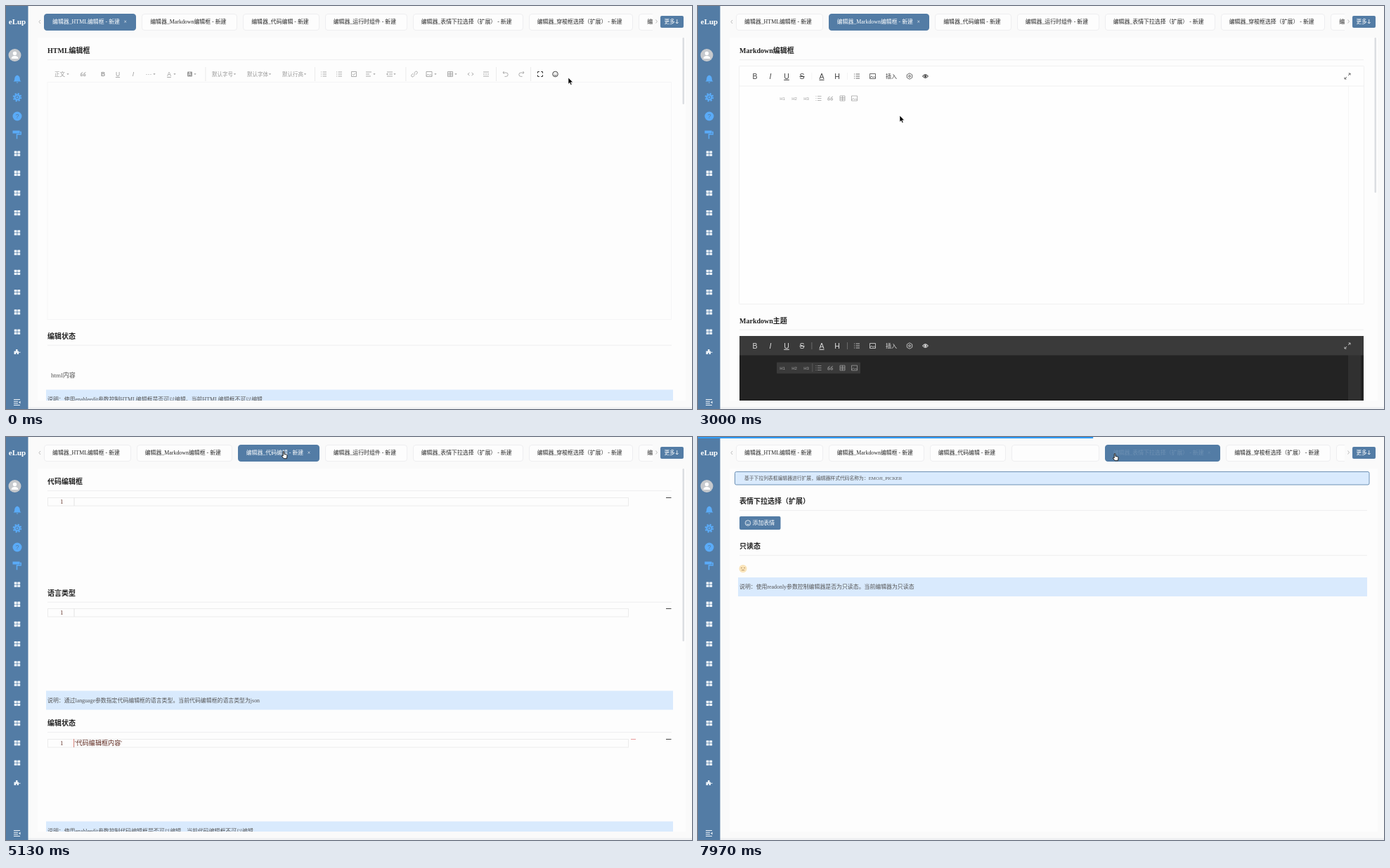
Recreate the animation shown at these times as an HTML page. Size 976x574 px, loop 8000 ms.

```html
<!DOCTYPE html>
<html lang="zh-CN">
<head>
<meta charset="utf-8">
<title>编辑器</title>
<style>
@property --a { syntax: "<number>"; inherits: true; initial-value: 0; } /* active */
@property --h { syntax: "<number>"; inherits: true; initial-value: 0; } /* hover */
@property --w { syntax: "<number>"; inherits: true; initial-value: 0; } /* extra width */
@property --o { syntax: "<number>"; inherits: true; initial-value: 1; } /* label opacity */

html, body { margin: 0; width: 100%; height: 100%; overflow: hidden; background: #fafafa; }
body, text { font-family: "Liberation Serif", "Noto Sans CJK SC", "Noto Sans CJK", serif; }
#stage { position: absolute; left: 0; top: 0; width: 976px; height: 574px; overflow: hidden; }
svg { position: absolute; left: 0; top: 0; }
.sans { font-family: "Liberation Sans", "Noto Sans CJK SC", sans-serif; }

.page, .arrow, .hand { animation: 8s step-end infinite; }
#p1 { animation-name: p1; }
#p2 { animation-name: p2; }
#p3 { animation-name: p3; }
#p4 { animation-name: p4; }
#p5 { animation-name: p5; }
@keyframes p1 { 0% { visibility: visible } 28%, 100% { visibility: hidden } }
@keyframes p2 { 0% { visibility: hidden } 28% { visibility: visible } 56.25%, 100% { visibility: hidden } }
@keyframes p3 { 0% { visibility: hidden } 56.25% { visibility: visible } 80.25%, 100% { visibility: hidden } }
@keyframes p4 { 0% { visibility: hidden } 80.25% { visibility: visible } 98.5%, 100% { visibility: hidden } }
@keyframes p5 { 0% { visibility: hidden } 98.5%, 100% { visibility: visible } }

#scroll { animation: scroll 8s ease-in-out infinite; }
#thumb { animation: thumb 8s ease-in-out infinite; }
@keyframes scroll { 0%, 38.875% { transform: translateY(0) } 42.375%, 100% { transform: translateY(-406px) } }
@keyframes thumb { 0%, 38.875% { transform: translateY(0) } 42.375%, 100% { transform: translateY(173px) } }

/* the editor outline fades in as the page settles */
#frame { animation: settle 8s linear infinite; }
@keyframes settle { 0%, 1.5% { opacity: .25 } 11.375%, 100% { opacity: 1 } }

#tabs { position: absolute; left: 54px; top: 11px; width: 866px; height: 23.5px; overflow: hidden; display: flex; gap: 8px; }
.tab {
  flex: none; box-sizing: border-box; overflow: hidden; white-space: nowrap; position: relative;
  height: 23.5px; line-height: 21px; font-size: 7.9px; border-radius: 4px;
  width: calc(var(--b) * 1px + 7.5px * var(--w) + 4px * var(--h));
  padding-left: calc(11px - 4px * var(--h));
  border: 1px solid rgb(calc(238 - 155 * var(--a)) calc(238 - 114 * var(--a)) calc(240 - 75 * var(--a)));
  background: rgb(calc(253 - 170 * var(--a)) calc(253 - 129 * var(--a)) calc(253 - 88 * var(--a)));
  color: rgb(calc(40 + 215 * var(--a) + 45 * var(--h)) calc(40 + 215 * var(--a) + 95 * var(--h)) calc(40 + 215 * var(--a) + 145 * var(--h)));
  animation: 8s linear infinite;
}
.tab span { opacity: var(--o); }
.tab i { font-style: normal; margin-left: 5.5px; opacity: calc((var(--a) + var(--h)) * var(--o)); }
.tab:nth-child(1) { animation-name: tab1; }
.tab:nth-child(2) { animation-name: tab2; }
.tab:nth-child(3) { animation-name: tab3; }
.tab:nth-child(4) { animation-name: tab4; }
.tab:nth-child(5) { animation-name: tab5; }
@keyframes tab1 {
  0% { --a: 1; --w: 1; --o: 1; animation-timing-function: step-end }
  28%, 29.25% { --a: 0; --w: 1; --o: 0 }
  31.25%, 100% { --a: 0; --w: 0; --o: 1 }
}
@keyframes tab2 {
  0%, 10% { --a: 0; --h: 0; --w: 0; --o: 1 }
  12.5% { --a: 0; --h: 1; --w: 0; --o: 1; animation-timing-function: step-end }
  28%, 29.25% { --a: 1; --h: 0; --w: 1; --o: .12 }
  31.25% { --a: 1; --h: 0; --w: 1; --o: 1; animation-timing-function: step-end }
  56.25%, 57.25% { --a: 0; --h: 0; --w: 1; --o: 0 }
  58.5%, 100% { --a: 0; --h: 0; --w: 0; --o: 1 }
}
@keyframes tab3 {
  0%, 53.125% { --a: 0; --h: 0; --w: 0; --o: 1 }
  54.875% { --a: 0; --h: 1; --w: 0; --o: 1; animation-timing-function: step-end }
  56.25%, 57.25% { --a: 1; --h: 0; --w: 1; --o: .12 }
  58.5% { --a: 1; --h: 0; --w: 1; --o: 1; animation-timing-function: step-end }
  80.25%, 81.625% { --a: 0; --h: 0; --w: 1; --o: 0 }
  83.625%, 100% { --a: 0; --h: 0; --w: 0; --o: 1 }
}
@keyframes tab4 {
  0%, 69% { --a: 0; --h: 0; --w: 0; --o: 1 }
  71.5% { --a: 0; --h: 1; --w: 0; --o: 1; animation-timing-function: step-end }
  80.25%, 81.625% { --a: 1; --h: 0; --w: 1; --o: .12 }
  83.625% { --a: 1; --h: 0; --w: 1; --o: 1; animation-timing-function: step-end }
  98.5%, 100% { --a: 0; --h: 0; --w: 1; --o: 0 }
}
@keyframes tab5 {
  0%, 89.4% { --a: 0; --h: 0; --w: 0; --o: 1 }
  92% { --a: 0; --h: 1; --w: 0; --o: 1; animation-timing-function: step-end }
  98.5%, 100% { --a: 1; --h: 0; --w: 1; --o: .15 }
}

#bar { position: absolute; left: 0; top: 0; width: 976px; height: 2px; background: #2f9bf5; transform-origin: 0 0; animation: bar 8s linear infinite; }
@keyframes bar {
  0% { transform: scaleX(0); opacity: 1 }
  28%, 28.4%, 56.25%, 56.65%, 80.25%, 80.65%, 98.5%, 98.8% { transform: scaleX(0); opacity: 1 }
  29.125%, 57.375%, 81.375%, 99.625%, 100% { transform: scaleX(.576); opacity: 1 }
  30.5%, 58.2%, 82.75% { transform: scaleX(1); opacity: 1 }
  31.5%, 58.5%, 83.75% { transform: scaleX(1); opacity: 0; animation-timing-function: step-end }
}

#cursor { animation: move 8s ease-in-out infinite; }
@keyframes move {
  0%, 1.5% { transform: translate(800px, 102px) }
  11.375%, 12.625% { transform: translate(246px, 22px) }
  15.5%, 34% { transform: translate(240px, 21px) }
  37.5%, 46.125% { transform: translate(287px, 156px) }
  51%, 52.5% { transform: translate(372px, 35px) }
  54.875%, 64.125% { transform: translate(394px, 20px) }
  72.625%, 84.5% { transform: translate(492px, 14px) }
  89.875% { transform: translate(590px, 23px) }
  92.375%, 100% { transform: translate(592px, 23px) }
}
.arrow { animation-name: arrow; }
.hand { animation-name: hand; }
@keyframes arrow { 0% { visibility: visible } 10% { visibility: hidden } 34.6% { visibility: visible } 53.125%, 100% { visibility: hidden } }
@keyframes hand { 0% { visibility: hidden } 10% { visibility: visible } 34.6% { visibility: hidden } 53.125%, 100% { visibility: visible } }
</style>
</head>
<body>
<div id="stage">
  <svg width="976" height="574">
    <rect x="45" y="45" width="922" height="517" fill="#fdfdfd"/>
    <rect y="571" width="976" height="3" fill="#f0f1f3"/>
    <g id="side"></g>
    <svg x="45" y="45" width="922" height="517" viewBox="45 45 922 517">
      <g id="p1" class="page"></g>
      <g id="p2" class="page"><g id="scroll"></g><rect id="thumb" x="962.5" y="45" width="2.5" height="221" rx="1.2" fill="#dcdee2"/></g>
      <g id="p3" class="page"></g>
      <g id="p4" class="page"></g>
      <g id="p5" class="page"></g>
    </svg>
  </svg>
  <div id="tabs">
    <div class="tab" style="--b:123.7"><span>编辑器_HTML编辑框 - 新建</span><i>×</i></div>
    <div class="tab" style="--b:136"><span>编辑器_Markdown编辑框 - 新建</span><i>×</i></div>
    <div class="tab" style="--b:108.5"><span>编辑器_代码编辑 - 新建</span><i>×</i></div>
    <div class="tab" style="--b:117"><span>编辑器_运行时组件 - 新建</span><i>×</i></div>
    <div class="tab" style="--b:157"><span>编辑器_表情下拉选择（扩展） - 新建</span><i>×</i></div>
    <div class="tab" style="--b:148.5"><span>编辑器_穿梭框选择（扩展） - 新建</span></div>
    <div class="tab" style="--b:120"><span>编辑器</span></div>
  </div>
  <div id="bar"></div>
  <svg width="976" height="574">
    <g id="cursor">
      <path class="arrow" d="M0 0v9.2l2.1-1.9 1.4 3.2 1.6-.7-1.4-3.1h2.9z" fill="#000" stroke="#fff" stroke-width=".6"/>
      <path class="hand" d="M.2 1q.9-1 1.7 0v3.4l3 .6q1.3.4 1.1 1.8l-.6 3.9h-4.2l-3-3.7q.2-1.3 2 0z" fill="#fff" stroke="#111" stroke-width=".9" stroke-linejoin="round"/>
    </g>
  </svg>
</div>
<script>
const BLUE = '#537ca5', PALE = '#d9eafd';
const icons = {
  list: 'M-4-3h1M-1.5-3h5.5M-4 0h1M-1.5 0h5.5M-4 3h1M-1.5 3h5.5',
  check: 'M-3.5-3.5h7v7h-7zM-2 0l1.5 1.5 2.7-3',
  align: 'M-4-3h8M-4 0h5M-4 3h7',
  indent: 'M-4-3h8M-1 0h5M-4 3h8M-4-1l1.5 1-1.5 1z',
  link: 'M-.5-1.5l2-2a1.7 1.7 0 0 1 2.4 2.4l-2 2M.5 1.5l-2 2a1.7 1.7 0 0 1-2.4-2.4l2-2M-1.2 1.2l2.4-2.4',
  img: 'M-4-3.5h8v7h-8zM-4 2.5l2.5-2.5 2 2 1.5-1.5 2 2',
  table: 'M-3.5-3.5h7v7h-7zM-3.5-1h7M-3.5 1.2h7M0-3.5v7',
  code: 'M-1.5-2l-2.5 2 2.5 2M1.5-2l2.5 2-2.5 2',
  rule: 'M-4-3h8M-4 3h8M-4 0h2M-1 0h2M2 0h2',
  undo: 'M-2.5-4l-1.5 2 2 1.5M-3.5-2h4a2.7 2.7 0 0 1 0 5.4h-2',
  redo: 'M2.5-4l1.5 2-2 1.5M3.5-2h-4a2.7 2.7 0 0 0 0 5.4h2',
  full: 'M-3.5-1.2v-2.3h2.3M1.2-3.5h2.3v2.3M3.5 1.2v2.3h-2.3M-1.2 3.5h-2.3v-2.3',
  smile: 'M-3.8 0a3.8 3.8 0 1 0 7.6 0a3.8 3.8 0 1 0-7.6 0M-2 .8a2.2 2.2 0 0 0 4 0M-1.4-1.4v.6M1.4-1.4v.6',
  quote: 'M-.7-2.5q-3 .6-3 3v2h2.4v-2.3h-2M3.5-2.5q-3 .6-3 3v2h2.4v-2.3h-2',
  gear: 'M0-4.2l3.7 2.1v4.2l-3.7 2.1-3.7-2.1v-4.2zM-1.4 0a1.4 1.4 0 1 0 2.8 0a1.4 1.4 0 1 0-2.8 0',
  eye: 'M-3.8 0q3.8-4.8 7.6 0q-3.8 4.8-7.6 0zM-1 0a1 1 0 1 0 2 0a1 1 0 1 0-2 0M-.4 0h.8',
  expand: 'M1-1l3-3M1.5-4h2.5v2.5M-1 1l-3 3M-4 1.5v2.5h2.5',
  chev: 'M-3-1.5l3 3 3-3',
  down: 'M-1.6-.8h3.2l-1.6 1.800z',
  user: 'M-4-3a4 4 0 1 0 8 0a4 4 0 1 0-8 0M-6 7q.3-5 4-6.4M2 .4q1 .5 1.7 1.5M1.8 5h5M4.3 2.500v5'
};

const put = (id, ...parts) => document.getElementById(id).insertAdjacentHTML('beforeend', parts.flat().join(''));
const text = (x, y, s, size = 7.9, fill = '#555', more = '') =>
  `<text x="${x}" y="${y + size * .36}" font-size="${size}" fill="${fill}" ${more}>${s}</text>`;
const mid = (x, y, s, size, fill, more = '') =>
  text(x, y, s, size, fill, `text-anchor="middle" class="sans" ${more}`);
const rect = (x, y, w, h, fill, more = '') =>
  `<rect x="${x}" y="${y}" width="${w}" height="${h}" fill="${fill}" ${more}/>`;
const icon = (name, x, y, c = '#999', w = .8) =>
  `<path d="${icons[name]}" transform="translate(${x} ${y})" fill="none" stroke="${c}" stroke-width="${w}"/>`;
const drop = (x, y) => `<path d="${icons.down}" transform="translate(${x} ${y})" fill="#999"/>`;
const line = (x, y, w, c = '#eeeeef') => rect(x, y, w, 1, c);
const head = (y, s, w = 888) => text(59, y, s, 10, '#222', 'font-weight="bold"') + line(59, y + 12.7, w);
const note = (y, s, w = 892) => rect(57, y, w, 27, PALE) + text(59, y + 13.5, s);
const thumb = h => rect(962.5, 45, 2.5, h, '#dcdee2', 'rx="1.2"');

// sidebar
const SKY = '#5aabf8';
put('side',
  rect(0, 0, 31.5, 574, BLUE),
  text(16, 22, 'eLup', 11, '#fff', 'text-anchor="middle" font-weight="bold"'),
  `<circle cx="12.5" cy="70" r="9" fill="#c6c9cd"/><circle cx="12.5" cy="67.5" r="2.7" fill="#fff"/><path d="M7.5 75q.5-4 5-4t5 4z" fill="#fff"/>`,
  `<path d="M10.5 107.5q2-1.5 1.8-4.5q.3-3.5 3.7-4.5q3.4 1 3.7 4.5q-.2 3 1.8 4.500zM14.5 108.5h3l-1.5 1.500z" fill="${SKY}"/>`,
  `<circle cx="16" cy="130" r="4.6" fill="${SKY}"/><circle cx="16" cy="130" r="5.3" fill="none" stroke="${SKY}" stroke-width="2" stroke-dasharray="2.2 1.96"/><circle cx="16" cy="130" r="2" fill="none" stroke="${BLUE}"/>`,
  `<circle cx="16" cy="157" r="6.5" fill="${SKY}"/>`, mid(16, 157, '?', 9, BLUE),
  `<path d="M9.5 177.5h10v4h-10z" fill="${SKY}"/><path d="M19.5 179.5h1.7v3.3h-5.7v6.5" fill="none" stroke="${SKY}" stroke-width="1.5"/>`,
  Array.from({ length: 10 }, (_, i) => [0, 1, 2, 3].map(k =>
    rect(11.7 + k % 2 * 4.6, 206.4 + i * 28.22 + (k >> 1) * 4, 3.9, 3.3, '#eef4fa', 'rx=".5"')).join('')),
  `<path d="M11.5 496v-4.5h2.5v-2.5h2.5v2.5h1.5v1.2h2.5v1h-2.5v2.3h-2.3v-2h-1.5v2z" fill="#eef4fa"/>`,
  line(11, 560, 9, '#eef4fa'), line(11, 562.7, 6, '#eef4fa'), line(11, 565.4, 6, '#eef4fa'), line(11, 568, 9, '#eef4fa'),
  `<path d="M20.5 562.5v4l-2.5-2z" fill="#eef4fa"/>`,
  `<path d="M49 20l-2 2.5 2 2.5M924.5 19.5l2 2.5-2 2.5" fill="none" stroke="#aaa" stroke-width=".8"/>`,
  rect(931, 14, 33, 17, BLUE, 'rx="2"'), text(936.5, 22, '更多', 7.6, '#fff'),
  `<path d="M954.7 19v6M952.7 23l2 2 2-2" fill="none" stroke="#fff" stroke-width=".8"/>`
);

// rich text editor page
const G = '#999';
put('p1',
  head(63.5, 'HTML编辑框'),
  text(69, 97, '正文', 7.5, G), icon('quote', 110, 97),
  mid(138, 97, 'B', 8.5, G, 'font-weight="bold"'), mid(159, 97, 'U', 8.5, G, 'text-decoration="underline"'),
  mid(181, 97, 'I', 8.5, G, 'font-style="italic"'), mid(203, 97, '···', 9, G),
  mid(232, 97, 'A', 8.5, G, 'text-decoration="underline"'),
  rect(258, 93.5, 7, 7, G, 'rx="1"'), mid(261.5, 97, 'A', 6.5, '#fff'),
  ['默认字号', '默认字体', '默认行高'].map((s, i) => text(293 + i * 50, 97, s, 7.5, G)),
  [88, 211, 240, 269, 325.5, 375.5, 425.5, 524, 553, 611, 640].map(x => drop(x, 97)),
  [283.5, 439, 568.5, 697, 746].map(x => rect(x, 87, .8, 20, '#e6e6e6')),
  Object.entries({ list: 452, check: 495, align: 516, indent: 546, link: 581, img: 602, table: 632, code: 661, rule: 683, undo: 711, redo: 733 })
    .map(([n, x]) => icon(n, x, 97)),
  icon('list', 474, 97), icon('full', 760, 97, '#333', 1), icon('smile', 781.5, 97, '#333', .9),
  rect(59, 108.5, 887.5, 338, '#fefefe', 'stroke="#dfdfe0" id="frame"'),
  head(470, '编辑状态'),
  text(64, 525.5, 'html内容', 9.1),
  note(546.5, '说明：使用enableedit参数控制HTML编辑框是否可以编辑。当前HTML编辑框不可以编辑'),
  thumb(95)
);

// markdown page
function markdown(y, dark, body) {
  const c = dark ? '#ddd' : '#444', m = dark ? '#aaa' : '#999', ty = y + 14, sy = y + 45.5;
  const letters = [['B', 81], ['I', 103, 'font-style="italic"'], ['U', 126, 'text-decoration="underline"'],
    ['S', 148, 'text-decoration="line-through"'], ['A', 176, 'text-decoration="underline"'], ['H', 198]];
  return [
    dark ? '' : rect(58, y - 1, 890, 340, '#f0f0f1', 'rx="2"'),
    rect(59, y, 888, 338, dark ? '#232323' : '#fefefe'),
    rect(925, y + 27, dark ? 18 : 1, 311, dark ? '#303030' : '#f5f5f6'),
    rect(59, y, 888, 27.5, dark ? '#3a3a3a' : '#fefefe'),
    dark ? '' : line(59, y + 27.5, 888, '#f1f1f2'),
    letters.map(([s, x, more]) => mid(x, ty, s, 10.5, c, more)),
    [161.5, 212].map(x => rect(x, ty - 5, .8, 10, dark ? '#777' : '#f0f0f0')),
    icon('list', 226, ty, c), icon('img', 248.5, ty, c), text(267, ty, '插入', 8, c),
    icon('gear', 301, ty, c), icon('eye', 323.5, ty, c, 1.1), icon('expand', 924, ty, c),
    body ? text(80, sy, body, 9.1) : [
      dark ? rect(112, y + 37.5, 119, 16, '#3a3a3a', 'rx="1"') + rect(162.5, y + 39, .7, 12, '#666') : '',
      ['H1', 'H2', 'H3'].map((s, i) => mid(120 + i * 17, sy, s, 6, m)),
      ['list', 'quote', 'table', 'img'].map((n, i) => icon(n, 171.5 + i * 17, sy, m, .7))]
  ].flat(3).join('');
}
put('scroll',
  head(63.5, 'Markdown编辑框'), markdown(86, false),
  head(448, 'Markdown主题'), markdown(470, true),
  note(813, '说明：使用customtheme参数指定Markdown编辑框的主题，可选值有light和dark，值为light时为亮色主题，值为dark时为暗色主题。当前Markdown编辑框为暗色主题'),
  head(858.5, '只读态'), markdown(881, false, 'Markdown内容')
);

// code page
const codeRow = y => [
  rect(59.5, y + .5, 826, 11.5, 'none', 'stroke="#ececec"'), rect(96.5, y, 1, 12, '#e4e4e4'),
  text(77, y + 6, '1', 9, '#6b3d33'), line(939, y, 7.5, '#444')
].join('');
put('p3',
  head(63.5, '代码编辑框'), codeRow(86),
  head(222, '语言类型'), codeRow(244),
  note(361.5, '说明：通过language参数指定代码编辑框的语言类型。当前代码编辑框的语言类型为json'),
  head(407.5, '编辑状态'), codeRow(430),
  rect(96, 430, 1, 12, '#d98880'), text(98, 435.5, "'代码编辑框内容'", 9.1, '#5f2a20'), line(889, 430, 7, '#e89a9a'),
  note(547.5, '说明：使用enableedit参数控制代码编辑框是否可以编辑。当前代码编辑框不可以编辑'),
  thumb(246)
);

// runtime component page
const pick = (y, s) => [
  text(64, y, s, 10.1, '#222', 'font-weight="bold"'), line(64, y + 12.5, 878),
  rect(64.5, y + 22.5, 435.5, 17.5, '#fefefe', 'stroke="#efeff0" rx="2"'),
  text(69, y + 31, '请选择', 8, '#888'), icon('chev', 490, y + 31.5, '#999'),
  text(507, y + 31, '值', 8, '#222'), text(521.5, y + 31, '-', 8, '#222')
].join('');
put('p4',
  head(63.5, '运行时组件'),
  [95, 122].map(y => icon('user', 90, y - 1, '#111', 1.4) + text(103, y + .5, '未设置', 9.1, '#111')),
  head(154, '单位选择'),
  ['【单选】指定单位及下级单位', '【多选】指定单位及下级单位', '【单选】全部单位', '【多选】全部单位']
    .map((s, i) => pick(186.3 + i * 63.75, s)),
  head(446, '部门选择'),
  pick(478, '【单选】指定单位及下级单位所有部门'), pick(541.8, '【多选】指定单位及下级单位所有部门'),
  thumb(219)
);

// emoji picker page
put('p5',
  rect(52.5, 49.5, 902.5, 18.5, PALE, 'stroke="#6c90b4" rx="2"'),
  text(66, 58.5, '基于下拉列表框编辑器进行扩展，编辑器样式代码名称为：EMOJI_PICKER', 6.8),
  head(91.5, '表情下拉选择（扩展）', 893),
  rect(59, 113, 58.5, 19, BLUE, 'rx="2"'), icon('smile', 71, 122.5, '#fff'), text(77.5, 122.5, '添加表情', 7.9, '#fff'),
  head(155.5, '只读态', 893),
  '<circle cx="64" cy="187.5" r="5.5" fill="#f9e3b8"/><path d="M61 186.5h2M65 186.5h2M62 189.5h4" stroke="#a9855a" stroke-width=".8"/>',
  note(200, '说明：使用readonly参数控制编辑器是否为只读态。当前编辑器为只读态', 895)
);
</script>
</body>
</html>
```
